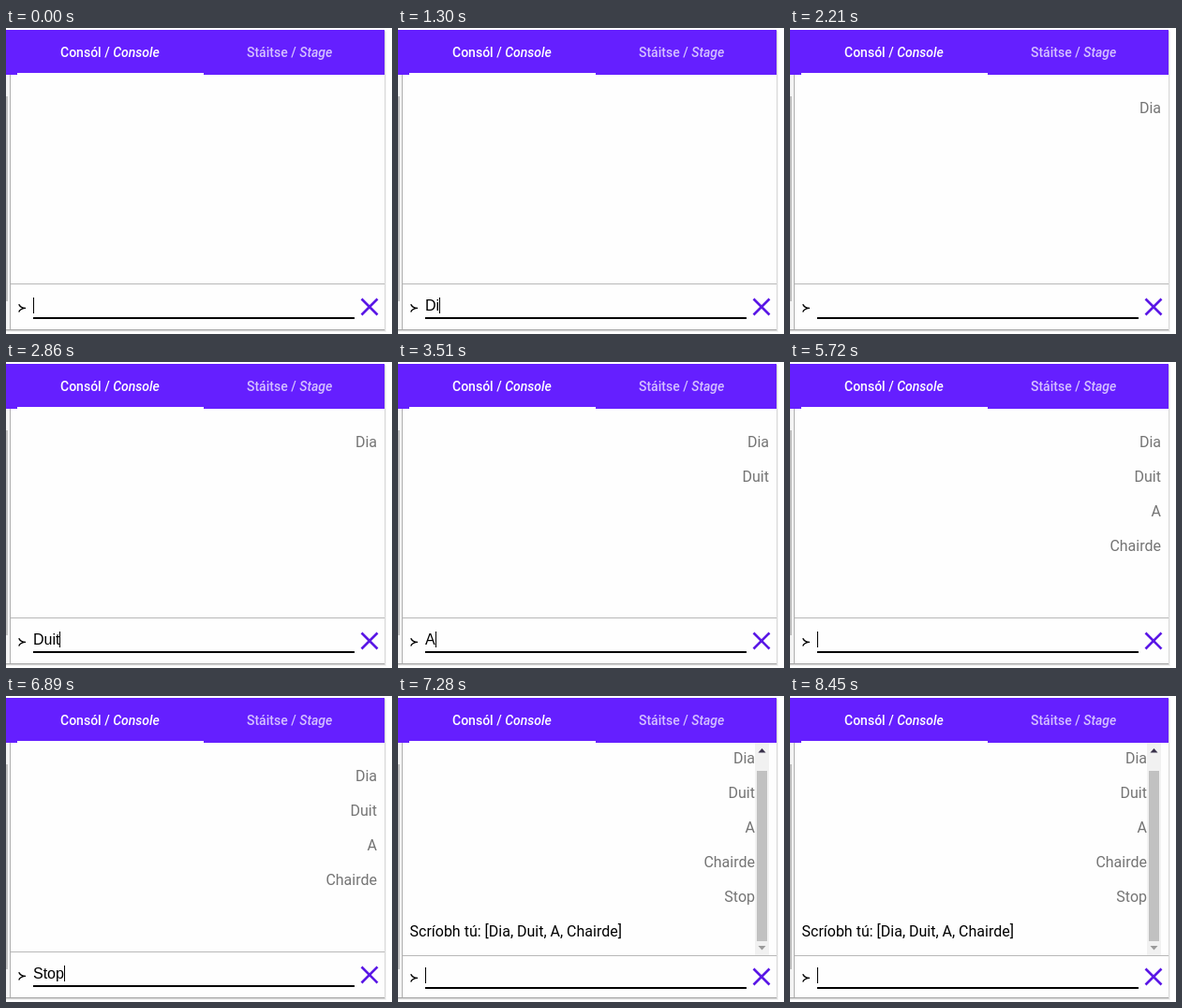
Recreate the animation shown at these times as an HTML page. Size 412 by 327 pixels, loop 8.84 s.

```html
<!DOCTYPE html>
<html lang="ga">
<head>
<meta charset="utf-8">
<title>Consól</title>
<style>
html, body { margin: 0; width: 100%; height: 100%; overflow: hidden; background: #fff; }
svg { display: block; width: 412px; height: 327px; }
text { font: 16px Roboto, sans-serif; white-space: pre; }
.tab { font-size: 14px; font-weight: 500; fill: #fff; }
.tab tspan { font-style: italic; }
.sent { fill: #757575; text-anchor: end; }
#typed { font-family: "Liberation Sans", Arial, sans-serif; }
</style>
</head>
<body>
<svg viewBox="0 0 412 327">
  <rect width="412" height="327" fill="#fff"/>
  <!-- card and its shadow -->
  <g shape-rendering="crispEdges">
    <rect y="4" width="406" height="321" fill="#f3f3f3"/>
    <rect y="3" width="405" height="321" fill="#d9d9d9"/>
    <rect y="2" width="404" height="321" fill="#a6a6a6"/>
    <rect y="2" width="404" height="320" fill="#fefefe"/>
    <rect y="50" width="4" height="272" fill="#f4f4f4"/>
    <rect y="73" width="2" height="219" fill="#c1c1c1"/>
    <rect x="4" y="50" width="1" height="272" fill="#b0b0b0"/>
  </g>

  <clipPath id="view"><rect x="5" y="50" width="399" height="227"/></clipPath>
  <g id="log" clip-path="url(#view)"></g>

  <g id="bar">
    <rect x="381" y="50" width="15" height="227" fill="#f1f1f1"/>
    <rect x="383" y="80" width="11" height="182" fill="#c1c1c1"/>
    <path d="M384.5 60.5h8l-4-4.5z" fill="#38304a"/>
    <path d="M384.5 267h8l-4 4.5z" fill="#9a9a9a"/>
  </g>

  <rect id="rule" x="5" y="273" width="399" height="1" fill="#b8b8b8"/>
  <g id="entry">
    <path d="M13.7 295.3Q15.5 299.4 21 299.4Q15.5 299.4 13.7 303.5" fill="none" stroke="#000" stroke-width="1.4"/>
    <rect x="29" y="309" width="343" height="2"/>
    <text id="typed" x="29" y="302"></text>
    <rect id="caret" y="288" width="1" height="17"/>
    <path d="M379.5 289.5l17 17m0-17l-17 17" stroke="#5a17e6" stroke-width="2.6"/>
  </g>

  <rect y="2" width="404" height="48" fill="#651fff"/>
  <rect x="12" y="48" width="199" height="2" fill="#fff"/>
  <text class="tab" x="58" y="31">Consól / <tspan>Console</tspan></text>
  <text class="tab" x="257" y="31" opacity=".72">Stáitse / <tspan>Stage</tspan></text>
</svg>
<script>
const LOOP = 8840;
const words = ["Dia", "Duit", "A", "Chairde", "Stop"];

// [time, letters typed] for each word, then the time it is sent
const typing = [
  { keys: [[910, 1], [1170, 2], [1430, 3]], sent: 1820 },
  { keys: [[2470, 1], [2730, 3], [2860, 4]], sent: 3250 },
  { keys: [[3510, 1]], sent: 4030 },
  { keys: [[4290, 1], [4420, 2], [4550, 3], [4680, 4], [4940, 6], [5200, 7]], sent: 5720 },
  { keys: [[6240, 1], [6370, 2], [6760, 3], [6890, 4]], sent: 7280 }
];
// moments when the caret blinks off and on again
const blinks = [[650, 910], [1950, 2470], [4160, 4290], [5850, 6240], [7540, 8190]];

const $ = id => document.getElementById(id);
const log = $("log"), typed = $("typed"), caret = $("caret");

function addText(content, y, cls) {
  const el = document.createElementNS("http://www.w3.org/2000/svg", "text");
  el.textContent = content;
  el.setAttribute("y", y);
  if (cls) el.setAttribute("class", cls);
  log.append(el);
  return el;
}

const lines = words.map((word, i) => addText(word, 91 + 37 * i, "sent"));
const reply = addText(`Scríobh tú: [${words.slice(0, 4).join(", ")}]`, 276);
reply.setAttribute("x", 12.5);

const show = (el, on) => el.setAttribute("visibility", on ? "visible" : "hidden");
const shift = (el, y) => el.setAttribute("transform", `translate(0 ${y})`);

function draw(t) {
  const done = t >= typing[4].sent;
  let input = "";
  typing.forEach(({ keys, sent }, i) => {
    show(lines[i], t >= sent);
    lines[i].setAttribute("x", done ? 381 : 396);
    lines[i].setAttribute("transform", `translate(0 ${done ? -19 : 0})`);
    if (t < sent)
      for (const [time, count] of keys) if (t >= time) input = words[i].slice(0, count);
  });

  show(reply, done);
  shift(reply, -19);
  show($("bar"), done);
  shift($("rule"), done ? 4 : 0);
  shift($("entry"), done ? 2 : 0);

  if (typed.textContent !== input) typed.textContent = input;
  const width = input ? typed.getComputedTextLength() : 0;
  caret.setAttribute("x", Math.round(29 + width));
  show(caret, !blinks.some(([off, on]) => t >= off && t < on));
}

const start = performance.now();
function tick() {
  draw((performance.now() - start) % LOOP);
  requestAnimationFrame(tick);
}
tick();
</script>
</body>
</html>
```
